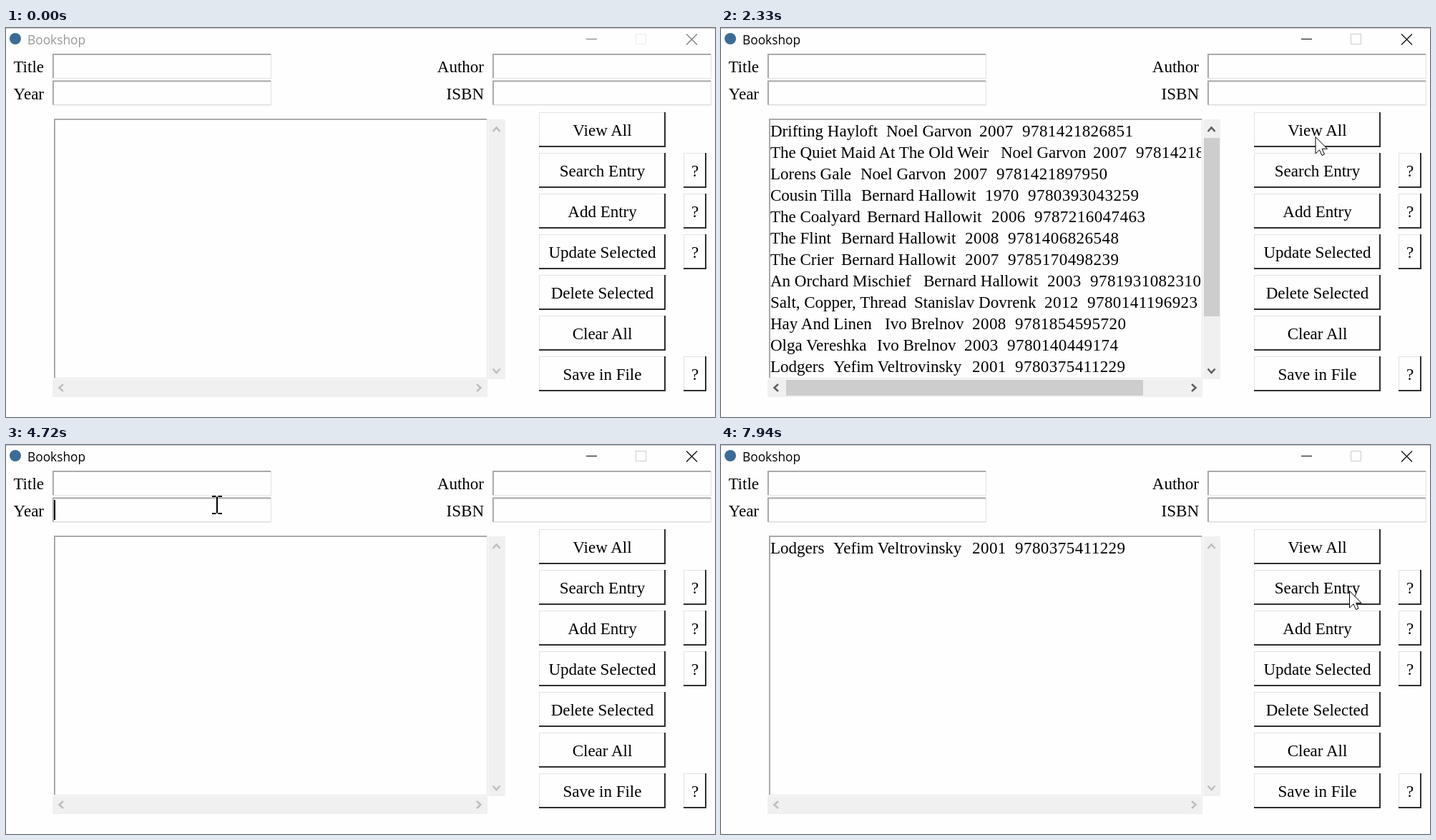
These frames come from a looping animation (991 px wide and 545 px high, 8000 ms). An HTML page:

```html
<!DOCTYPE html>
<html lang="en">
<head>
<meta charset="utf-8">
<title>Bookshop</title>
<style>
  html, body { margin: 0; width: 100%; height: 100%; overflow: hidden; background: #fefefe; }
  svg { display: block; width: 991px; height: 545px; }
  text { font: 23px "Liberation Serif", "Times New Roman", serif; fill: #000; }
  .num { letter-spacing: .45px; }
  .caption { font: 17.3px "Open Sans", sans-serif; }
  .hidden { display: none; }
</style>
</head>
<body>
<svg id="stage" viewBox="0 0 991 545"></svg>
<script>
const LOOP = 8000;
const stage = document.getElementById('stage');

function add(tag, attrs, parent = stage, content = '') {
  const node = document.createElementNS('http://www.w3.org/2000/svg', tag);
  for (const key in attrs) node.setAttribute(key, attrs[key]);
  node.textContent = content;
  parent.append(node);
  return node;
}
const group = (parent = stage) => add('g', {}, parent);
const rect = (x, y, width, height, fill, parent) => add('rect', { x, y, width, height, fill }, parent);
const line = (d, stroke, width, parent) =>
  add('path', { d, stroke, 'stroke-width': width, fill: 'none' }, parent);
const label = (x, y, content, anchor = 'start', parent = stage, cls = '') =>
  add('text', { x, y, 'text-anchor': anchor, class: cls }, parent, content);
const show = (node, on) => node.classList.toggle('hidden', !on);

// Title bar
rect(0, 0, 991, 545, '#fefefe');
rect(0, 0, 991, 1, '#c4c4c4');
add('circle', { cx: 13, cy: 15, r: 8, fill: '#3c6c96' });
const caption = label(30, 23, 'Bookshop', 'start', stage, 'caption');
const minimize = line('M811 15.5H826', '#000', 1);
const maximize = line('M880.5 8.5H894.5V22.5H880.5Z', '#ccc', 1);
const close = line('M951 8.5L966 23.5M966 8.5L951 23.5', '#000', 1.1);

function sunken(x, y, w, h) {
  rect(x, y, w, h, '#e3e3e3');
  rect(x, y, w - 1, h - 1, '#a0a0a0');
  rect(x + 1, y + 1, w - 2, h - 2, '#b4b4b4');
  rect(x + 2, y + 2, w - 3, h - 3, '#fefefe');
}

// Entry fields
[[53, 65, ['Title', 'Year']], [668, 680, ['Author', 'ISBN']]].forEach(([right, x, names]) =>
  names.forEach((name, i) => {
    label(right, 62 + i * 37.5, name, 'end');
    sunken(x, 36 + i * 37.5, 306, 35);
  }));
const yearText = label(68, 99.5, '', 'start', stage, 'num');
const caret = rect(67, 77, 2, 28, '#000');

// Book list: title, author x, author, year x, year, ISBN
const BERNARD = 'Bernard Hallowit', NOEL = 'Noel Garvon', IVO = 'Ivo Brelnov';
const books = [
  ['Drifting Hayloft', 231, NOEL, 361, 2007, '9781421826851'],
  ['The Quiet Maid At The Old Weir', 391, NOEL, 520, 2007, '9781421803715'],
  ['Lorens Gale', 195, NOEL, 325, 2007, '9781421897950'],
  ['Cousin Tilla', 196, BERNARD, 369, 1970, '9780393043259'],
  ['The Coalyard', 204, BERNARD, 378, 2006, '9787216047463'],
  ['The Flint', 168, BERNARD, 341, 2008, '9781406826548'],
  ['The Crier', 168, BERNARD, 341, 2007, '9785170498239'],
  ['An Orchard Mischief', 283, BERNARD, 456, 2003, '9781931082310'],
  ['Salt, Copper, Thread', 270, 'Stanislav Dovrenk', 452, 2012, '9780141196923'],
  ['Hay And Linen', 229, IVO, 351, 2008, '9781854595720'],
  ['Olga Vereshka', 218, IVO, 340, 2003, '9780140449174'],
  ['Lodgers', 157, 'Yefim Veltrovinsky', 351, 2001, '9780375411229'],
];
sunken(67, 127, 606, 364);
const clip = add('clipPath', { id: 'list' });
rect(69, 129, 602, 361, '#000', clip);
const list = add('g', { 'clip-path': 'url(#list)' });
function bookRow([title, authorX, author, yearX, year, isbn], row, parent) {
  const y = 152 + row * 30;
  label(69, y, title, 'start', parent);
  label(authorX, y, author, 'start', parent);
  label(yearX, y, year, 'start', parent, 'num');
  label(yearX + 60, y, isbn, 'start', parent, 'num');
}
const allBooks = group(list), foundBook = group(list);
books.forEach((book, i) => bookRow(book, i, allBooks));
bookRow(books[books.length - 1], 0, foundBook);

// Scrollbars
function scrollbar(track, thumb, arrows) {
  rect(...track, '#f0f0f0');
  const bar = rect(...thumb, '#cdcdcd');
  const chevrons = line(arrows, '#bfbfbf', 2.6);
  return on => {
    show(bar, on);
    chevrons.setAttribute('stroke', on ? '#606060' : '#bfbfbf');
  };
}
const setVertical = scrollbar([674, 128, 24, 364], [675, 154, 22, 250],
  'M680.5 145L685.5 139.5L690.5 145M680.5 477.5L685.5 483L690.5 477.5');
const setHorizontal = scrollbar([65, 492, 608, 25], [91, 493, 499, 22],
  'M80 499L74.5 504L80 509M658 499L663.5 504L658 509');

// Buttons
function button(x, y, w, text) {
  const up = group(), down = group(), mid = x + w / 2;
  rect(x, y, w, 49, '#2e2e2e', up);
  rect(x, y, w - 2, 47, '#e3e3e3', up);
  rect(x + 1, y + 1, w - 3, 46, '#fefefe', up);
  label(mid, y + 33, text, 'middle', up);
  rect(x, y, w - 1, 48, '#e3e3e3', down);
  rect(x, y, w - 2, 47, '#808080', down);
  rect(x + 2, y + 2, w - 4, 45, '#f0f0f0', down);
  label(mid + 2, y + 35, text, 'middle', down).style.fill = '#fff';
  return pressed => { show(up, !pressed); show(down, pressed); };
}
const setPressed = ['View All', 'Search Entry', 'Add Entry', 'Update Selected',
  'Delete Selected', 'Clear All', 'Save in File']
  .map((name, i) => button(745, 118 + i * 57, 177, name));
[1, 2, 3, 6].forEach(i => button(947, 118 + i * 57, 32, '?')(false));

// Pointer
const spot = add('circle', { r: 18, fill: '#faf000', 'fill-opacity': .6 });
const arrow = add('path', {
  d: 'M.5 .5V24L6 18.8L9.5 26.5L13 25L9.6 17.3H17Z', fill: '#fff', stroke: '#000', 'stroke-width': 1
});
const beam = line('M-7 -12H-1.5M1.5 -12H7M0 -11.5V11.5M-7 12H-1.5M1.5 12H7', '#000', 2);

// Start, end, steps, then start, control and end point of a quadratic curve
const moves = [
  [140, 510, 6, [922, 420], [850, 280], [836, 120]],
  [740, 900, 3, [836, 126], [836, 138], [836, 147]],
  [2330, 3110, 11, [830.5, 152], [798, 300], [814, 426]],
  [3190, 3190, 2, [816, 427], [816, 427], [816, 427]],
  [3940, 4410, 7, [780, 400], [300, -53], [295, 84]],
  [6450, 7010, 8, [340, 92], [650, 110], [878, 204]],
];
function pointerAt(t) {
  const move = moves.filter(m => t >= m[0]).pop();
  if (!move) return null;
  const [start, end, steps, a, b, c] = move;
  const progress = end > start ? Math.min(1, (t - start) / (end - start)) : 1;
  const u = Math.floor(progress * (steps - 1) + 1e-6) / (steps - 1);
  return a.map((_, i) => (1 - u) ** 2 * a[i] + 2 * u * (1 - u) * b[i] + u * u * c[i]);
}

const within = (t, from, to) => t >= from && t < to;
const clicks = [[1050, 1220, 0], [3440, 3610, 5], [7180, 7310, 1]];
const keys = [5350, 5520, 5680, 5890];
const caretOn = [[4640, 5270], [5350, 6140], [6450, 7940]];

function render(t) {
  const active = t >= 1050;
  caption.style.fill = active ? '#000' : '#999';
  minimize.setAttribute('stroke', active ? '#000' : '#777');
  close.setAttribute('stroke', active ? '#000' : '#777');
  maximize.setAttribute('stroke', active ? '#ccc' : '#ebebeb');

  show(allBooks, within(t, 1220, 3610));
  show(foundBook, t >= 7310);
  setVertical(within(t, 1295, 3610));
  setHorizontal(within(t, 1370, 3610));

  const click = clicks.find(([from, to]) => within(t, from, to));
  setPressed.forEach((set, i) => set(!!click && click[2] === i));

  const typed = t < 7310 ? keys.filter(k => t >= k).length : 0;
  yearText.textContent = '2001'.slice(0, typed);
  caret.setAttribute('x', 67 + typed * 12);
  show(caret, caretOn.some(([from, to]) => within(t, from, to)));

  const pos = pointerAt(t);
  const inField = !!pos && within(pos[0], 65, 371) && within(pos[1], 36, 108);
  const focusing = within(t, 4640, 4720);
  show(arrow, !!pos && !inField);
  show(beam, inField);
  show(spot, !!click || focusing);
  if (pos) {
    const [x, y] = pos;
    arrow.setAttribute('transform', `translate(${x} ${y})`);
    beam.setAttribute('transform', `translate(${x} ${y})`);
    spot.setAttribute('transform', focusing ? `translate(${x - 3} ${y - 2})` : `translate(${x} ${y})`);
  }
}

const began = performance.now();
function tick() {
  render((performance.now() - began) % LOOP);
  requestAnimationFrame(tick);
}
tick();
</script>
</body>
</html>
```
